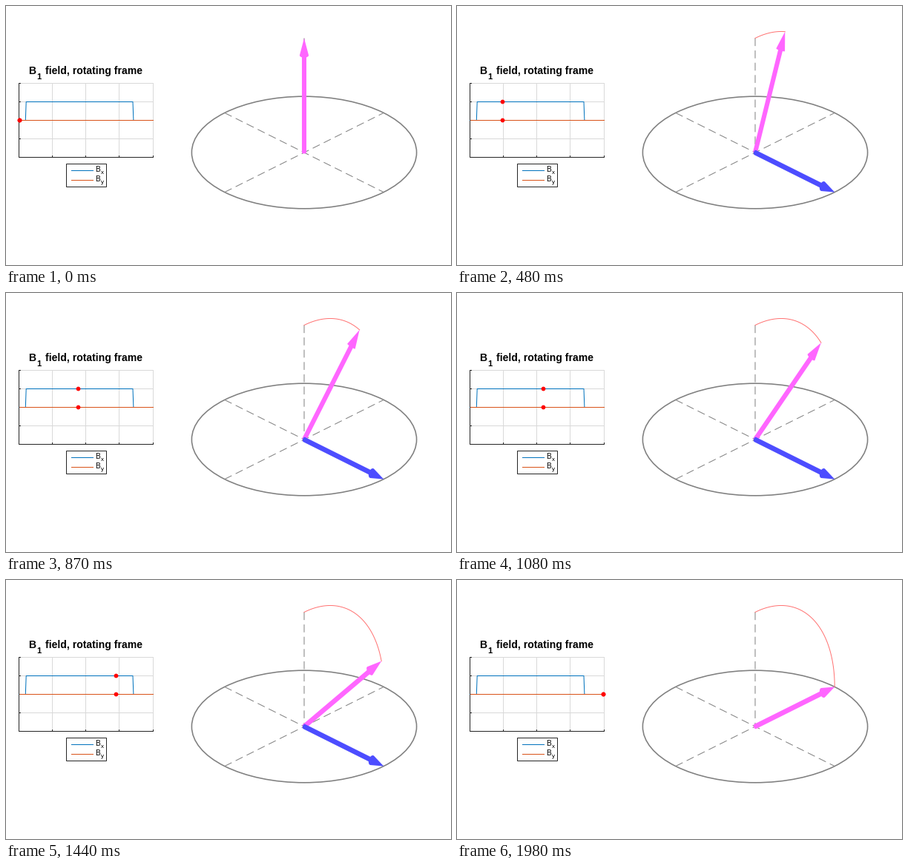
A matplotlib script that plays this animation: 600 by 350 pixels, repeating every 2.01 s.

```python
import numpy as np
import matplotlib.pyplot as plt
from matplotlib.animation import FuncAnimation
from matplotlib.patches import Ellipse, Polygon, Rectangle

W, H, DPI = 600, 350, 100
FRAMES, STEP_MS = 67, 30
PULSE_START, PULSE_END = 3, 56
PX = 72 / DPI

ORIGIN = np.array([402.0, 198.0])
# Screen offsets of the x, y and z unit vectors
BASIS = np.array([[107.2, 53.6], [107.2, -53.6], [0.0, -154.5]])
X, Y, Z = np.eye(3)

GREY, DARK, GRID = "0.5", "0.15", "0.85"
BLUE, ORANGE = "#0072bd", "#d95319"
ZERO_Y, PULSE_Y = 154, 129

fig = plt.figure(figsize=(W / DPI, H / DPI), dpi=DPI, facecolor="white")
ax = fig.add_axes([0, 0, 1, 1])
ax.set_xlim(0, W)
ax.set_ylim(H, 0)
ax.axis("off")


def line(xs, ys, color, width=1, **kw):
    return ax.plot(xs, ys, color=color, lw=width * PX, **kw)[0]


def text(x, y, s, size, **kw):
    ax.text(x, y, s, fontsize=size * PX, family="Liberation Sans",
            va="baseline", **kw)


def project(points):
    return ORIGIN + np.asarray(points) @ BASIS


def hull(points):
    """Convex hull by monotone chain."""
    pts = sorted(map(tuple, points))

    def half(seq):
        out = []
        for p in seq:
            while len(out) > 1:
                (x0, y0), (x1, y1) = out[-2:]
                if (x1 - x0) * (p[1] - y0) > (y1 - y0) * (p[0] - x0):
                    break
                out.pop()
            out.append(p)
        return out[:-1]

    return np.array(half(pts) + half(pts[::-1]))


class Arrow:
    """Flat-shaded 3D arrow: a cylinder with a cone on top."""
    NECK, SHAFT_R, HEAD_R = 0.85, 0.02, 0.04

    def __init__(self, color, z):
        self.parts = [ax.add_patch(Polygon(np.zeros((3, 2)), fc=color, lw=0,
                                           zorder=z)) for _ in range(2)]

    def point(self, d, u):
        a = np.linspace(0, 2 * np.pi, 40, endpoint=False)[:, None]
        ring = np.cos(a) * u + np.sin(a) * np.cross(d, u)
        neck = self.NECK * d
        shaft = np.vstack([self.SHAFT_R * ring, neck + self.SHAFT_R * ring])
        head = np.vstack([neck + self.HEAD_R * ring, d])
        for part, pts in zip(self.parts, (shaft, head)):
            part.set_xy(hull(project(pts)))

    def show(self, on):
        for part in self.parts:
            part.set_visible(on)


def draw_plot():
    # Whole numbers snap to the centre of that pixel
    left, right, top, bottom = 17, 198, 104, 204
    xs = [62, 107, 152, right]
    ys = [top, PULSE_Y, ZERO_Y, 179]
    for x in xs:
        line([x, x], [top, bottom], GRID, zorder=1)
    for y in ys:
        line([left, right], [y, y], GRID, zorder=1)
    line([left, left, right], [top, bottom, bottom], DARK, zorder=2)
    for x in xs:
        line([x, x], [bottom, bottom - 2], DARK, zorder=2)
    for y in ys:
        line([left, left + 2], [y, y], DARK, zorder=2)
    low, high = ZERO_Y + 0.5, PULSE_Y + 0.5
    line([18, 26.3, 27.2, 171, 171.9, right],
         [low, low, high, high, low, low], BLUE, zorder=3, snap=False)
    line([18, right], [ZERO_Y, ZERO_Y], ORANGE, zorder=4)

    text(30.5, 92, "B", 14, weight="bold")
    text(41, 99, "1", 11, weight="bold")
    text(52.8, 92, "field, rotating frame", 14, weight="bold")


def draw_legend():
    ax.add_patch(Rectangle((81, 213), 54, 31, fc="white", ec=DARK, lw=PX))
    for y, sub, color in ((222, "x", BLUE), (235, "y", ORANGE)):
        line([87.5, 116.5], [y, y], color)
        text(120.5, y + 2, "B", 10)
        text(127.5, y + 5.2, sub, 8)


def draw_scene():
    ax.add_patch(Ellipse(ORIGIN, 303.2, 151.6, fc="none", ec=GREY,
                         lw=1.6 * PX, zorder=2))
    for a, b in ((-X, X), (-Y, Y), (Z, 0 * Z)):
        (x0, y0), (x1, y1) = project([a, b])
        line([x0, x1], [y0, y1], GREY, zorder=1, dashes=(10.6, 6),
             dash_capstyle="butt", snap=False)


draw_plot()
draw_legend()
draw_scene()
trace = line([], [], "#ff7373", zorder=4)
spin = Arrow("#ff66ff", 5)
field = Arrow("#4d4dff", 6)
field.point(X, Y)
dots = line([], [], "red", zorder=7, ls="none", marker="o",
            ms=5.8 * PX, mew=0)


def direction(angle):
    return np.outer(np.sin(angle), Y) + np.outer(np.cos(angle), Z)


def update(i):
    turn = np.clip((i - PULSE_START) / (PULSE_END - PULSE_START), 0, 1)
    angle = turn * np.pi / 2
    spin.point(direction(angle)[0], X)
    trace.set_data(*project(direction(np.linspace(0, angle, 60))).T)
    trace.set_visible(angle > 0)

    on = PULSE_START < i <= PULSE_END
    field.show(on)
    x = 17.8 + 179.3 * i / (FRAMES - 1)
    dots.set_data([x, x], [ZERO_Y, PULSE_Y if on else ZERO_Y])
    return [trace, dots, *spin.parts, *field.parts]


anim = FuncAnimation(fig, update, frames=FRAMES, interval=STEP_MS,
                     repeat=True, repeat_delay=0, blit=False)
plt.show()
```
